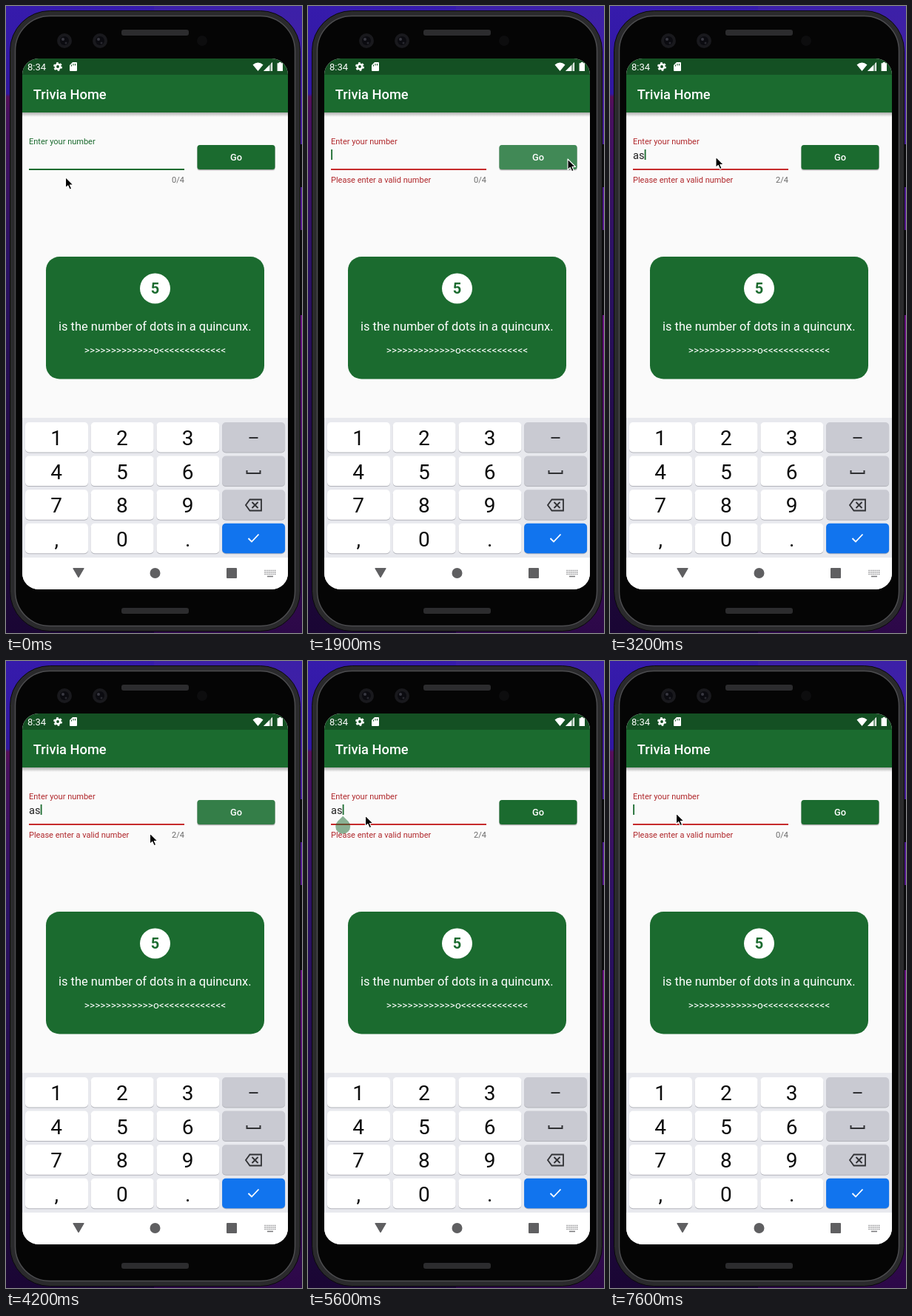
Recreate the animation shown at these times as an HTML page. Size 400 px wide and 848 px high, loop 8000 ms.

```html
<!DOCTYPE html>
<html lang="en">
<head>
<meta charset="utf-8">
<style>
  html, body { margin: 0; width: 100%; height: 100%; overflow: hidden; background: #000; }
  svg { display: block; width: 100%; height: 100%; }
  text { font-family: Roboto, sans-serif; white-space: pre; }
  .mid { text-anchor: middle; }
  .medium { font-weight: 500; }
  .small { font-size: 11px; }
</style>
</head>
<body>
<svg viewBox="0 0 400 848">
  <defs>
    <linearGradient id="leftWall" x2="0" y2="1">
      <stop offset="0" stop-color="#361bac"/><stop offset=".14" stop-color="#3017a0"/>
      <stop offset=".145" stop-color="#560f58"/><stop offset=".17" stop-color="#48105e"/>
      <stop offset=".4" stop-color="#2b1266"/><stop offset=".75" stop-color="#210a42"/>
      <stop offset="1" stop-color="#1a0634"/>
    </linearGradient>
    <linearGradient id="rightWall" x2="0" y2="1">
      <stop offset="0" stop-color="#3c20a8"/><stop offset=".25" stop-color="#4a1e98"/>
      <stop offset=".5" stop-color="#6a1282"/><stop offset=".75" stop-color="#42105e"/>
      <stop offset="1" stop-color="#2c0848"/>
    </linearGradient>
    <linearGradient id="barShadow" x2="0" y2="1">
      <stop offset="0" stop-opacity=".3"/><stop offset="1" stop-opacity="0"/>
    </linearGradient>
    <clipPath id="screen"><rect x="22" y="71" width="359" height="718" rx="22"/></clipPath>
    <clipPath id="buttonShape"><rect x="258.5" y="188" width="105" height="33" rx="3.5"/></clipPath>
  </defs>

  <rect width="200" height="848" fill="url(#leftWall)"/>
  <rect x="200" width="200" height="848" fill="url(#rightWall)"/>

  <!-- phone body -->
  <path d="M396 187h4v58h-4zM396 303h4v115h-4z" fill="#0b0b0d"/>
  <rect x="5.500" y="6.500" width="392" height="839" rx="54" fill="#2a2a2c" stroke="#09090a"/>
  <rect x="12.500" y="13.500" width="378" height="825" rx="47" fill="#050505" stroke="#4c4c4f" stroke-width="1.500"/>
  <g fill="#2c2c2e">
    <rect x="156" y="32" width="91" height="8" rx="3"/>
    <rect x="156" y="814" width="91" height="8" rx="3"/>
  </g>
  <g id="lenses"></g>
  <circle cx="265" cy="47" r="7" fill="#0d0d0e"/>

  <g clip-path="url(#screen)">
    <rect x="22" y="71" width="359" height="718" fill="#fafafa"/>
    <rect x="22" y="144" width="359" height="6" fill="url(#barShadow)"/>
    <rect x="22" y="71" width="359" height="23" fill="#145023"/>
    <rect x="22" y="93" width="359" height="51" fill="#1b6b2f"/>

    <!-- status bar -->
    <g fill="#fff">
      <text x="29" y="87" font-size="13">8:34</text>
      <circle cx="70" cy="82" r="3.200" fill="none" stroke="#fff" stroke-width="2.600"/>
      <circle cx="70" cy="82" r="5" fill="none" stroke="#fff" stroke-width="2" stroke-dasharray="2.620 2.620"/>
      <path d="M90 76h5q1 0 1 1v10q0 1-1 1h-8q-1 0-1-1v-7z"/>
      <path d="M88.500 79.500v2M91 78v2.500M93.500 78v2.500" stroke="#145023"/>
      <path d="M333.500 79.500q7-6 14 0L340.500 88z"/>
      <path d="M360 76v12h-12z" opacity=".45"/><path d="M356 80v8h-8z"/><path d="M360 76v12h-1.500v-10.500z"/>
      <path d="M368.800 76h3v1.300h2.200v10.700h-7.400v-10.700h2.200z"/>
      <text class="medium" x="36.800" y="126" font-size="18.280">Trivia Home</text>
    </g>

    <!-- form -->
    <text id="label" class="small" x="31" y="187">Enter your number</text>
    <text id="value" x="31" y="206.500" font-size="14.600" fill="#222"></text>
    <rect id="line" x="31" y="220" width="210" height="2"/>
    <text id="error" class="small" x="31" y="238.500" fill="#b0282c">Please enter a valid number</text>
    <text id="counter" class="small" x="241" y="238.500" text-anchor="end" fill="#6a6a6a"></text>
    <rect id="caret" y="194" width="1.800" height="14" fill="#1b6b2f"/>
    <path id="handle" d="M0 -14L7.070 -7.070A10 10 0 1 1 -7.070 -7.070Z" fill="#1b6b2f"/>

    <rect x="258" y="189" width="106" height="34" rx="4" opacity=".1"/>
    <rect x="258.500" y="189" width="105" height="33" rx="3.500" opacity=".25"/>
    <g clip-path="url(#buttonShape)">
      <rect x="258" y="188" width="106" height="33" fill="#1b6b2f"/>
      <rect id="glow" x="258" y="188" width="106" height="33" fill="#d8fff0"/>
      <circle id="ripple" cy="207" fill="#d8fff0" opacity=".1"/>
    </g>
    <text class="mid medium" x="311" y="209" font-size="12.800" fill="#fff">Go</text>

    <!-- fact card -->
    <rect x="54" y="339" width="295" height="165.500" rx="18.300" fill="#1b6b2f"/>
    <circle cx="201.500" cy="382" r="20.500" fill="#fff"/>
    <g class="mid" fill="#fff">
      <text x="201.500" y="388.500" font-size="20" font-weight="700" fill="#1b6b2f">5</text>
      <text x="201.300" y="438.500" font-size="16.450">is the number of dots in a quincunx.</text>
      <text x="201.500" y="470" font-size="13.700">&gt;&gt;&gt;&gt;&gt;&gt;&gt;&gt;&gt;&gt;&gt;&gt;&gt;o&lt;&lt;&lt;&lt;&lt;&lt;&lt;&lt;&lt;&lt;&lt;&lt;&lt;</text>
    </g>

    <!-- keyboard and navigation -->
    <rect x="22" y="557" width="359" height="189" fill="#e8e9ee"/>
    <g id="keys"></g>
    <g fill="none" stroke="#303134" stroke-width="2">
      <path d="M328.500 584h12"/>
      <path d="M325.500 628v4h18v-4"/>
      <path d="M329.500 667.500h15.500v15h-15.500l-5.500-7.500zM332.500 671l8 8m0-8l-8 8" stroke-width="1.800"/>
      <path d="M327.500 720l4.500 4.500 9.500-10" stroke="#fff" stroke-width="1.800"/>
    </g>
    <rect x="22" y="746" width="359" height="43" fill="#fff"/>
    <g fill="#5f5f61">
      <path d="M91 760h14q1 0 .5 1l-6.700 11.500q-.8 1-1.600 0L90.500 761q-.5-1 .5-1z"/>
      <circle cx="201.500" cy="767" r="7"/>
      <rect x="298" y="760" width="14" height="14" rx="1"/>
    </g>
    <path d="M349.500 763.500h15M349.500 766h15M349.500 768.500h15" stroke="#77777a" stroke-width="1.300" stroke-dasharray="1.300 1.380"/>
    <path d="M353 771.500h8" stroke="#77777a" stroke-width="1.300"/>
  </g>

  <path id="pointer" d="M0 0V14.500L3.300 11.500L5.600 16.700L8.200 15.600L5.900 10.500H10.500Z" fill="#000" stroke="#fff" stroke-width="1.100" stroke-linejoin="round"/>
</svg>

<script>
const LOOP = 8000, STEP = 100;
const GREEN = '#1b6b2f';
const el = id => document.getElementById(id);
const set = (id, attrs) => {
  for (const name in attrs) el(id).setAttribute(name, attrs[name]);
};

el('lenses').innerHTML = [79, 127].map(x =>
  `<circle cx="${x}" cy="47" r="10" fill="#19191d"/><circle cx="${x}" cy="47" r="6" fill="#0b0b10"/>
   <circle cx="${x - 2}" cy="45" r="2" fill="#393942"/><circle cx="${x + 2}" cy="50" r="1.5" fill="#292930"/>`).join('');

el('keys').innerHTML = ['123 ', '456 ', '789 ', ',0. '].map((row, r) => [...row].map((char, c) => {
  const x = 26 + c * 88.7, y = 563 + r * 45.6;
  const fill = c < 3 ? '#fff' : r < 3 ? '#c9cad2' : '#1174ee';
  const key = (top, color) => `<rect x="${x}" y="${top}" width="85" height="40.5" rx="5" fill="${color}"/>`;
  return key(y + 1, '#b2b3ba') + key(y, fill) +
    `<text class="mid" x="${x + 42.2}" y="${y + 31.2}" font-size="28" fill="#0c0c0c">${char}</text>`;
}).join('')).join('');

// Linear interpolation over rows of [time, value, ...].
function track(rows, t) {
  const next = rows.findIndex(row => row[0] > t);
  if (next < 0) return rows[rows.length - 1].slice(1);
  const from = rows[next - 1], to = rows[next];
  const k = (t - from[0]) / (to[0] - from[0]);
  return from.slice(1).map((v, i) => v + (to[i + 1] - v) * k);
}

const pointerPath = [
  [0, 80.5, 231.5], [1000, 80.5, 231.5], [1600, 351, 207], [1900, 351, 207],
  [2500, 143, 204], [3200, 143, 204], [3700, 325, 206], [3900, 325, 206],
  [4200, 194.5, 233], [4800, 94.5, 251], [4900, 94.5, 251], [5400, 77.5, 209],
  [7000, 77.5, 209], [7300, 89.5, 206]
];
const glowLevel = [
  [0, 0], [1500, 0], [1700, .08], [1900, .2], [2000, .16], [2300, 0],
  [3600, 0], [3800, .08], [4000, .2], [4200, .13], [4500, 0]
];
const handleLevel = [[0, 0], [5500, 0], [5700, 1], [6300, 1], [6500, 0]];
const edits = [[0, ''], [3000, 'a'], [3100, 'as'], [6300, 'a'], [6600, '']];
const caretResets = [1700, 3000, 3100, 5600, 6300, 6600];
const presses = [[1700, 351], [3800, 325]];
const caretOffset = { '': 0, a: 7.5, as: 15.5 };

function draw(t) {
  const text = edits.filter(([start]) => start <= t).pop()[1];
  const invalid = t >= 1700;
  const reset = caretResets.filter(start => start <= t).pop();
  const caretOn = reset !== undefined && Math.floor((t - reset) / 500) % 2 === 0;
  const caretX = 31.2 + caretOffset[text];

  el('value').textContent = text;
  el('counter').textContent = text.length + '/4';
  set('label', { fill: invalid ? '#b0282c' : GREEN });
  set('line', { fill: invalid ? '#c62a2c' : GREEN });
  set('error', { opacity: track([[0, 0], [1600, 0], [1800, 1]], t)[0] });
  set('caret', { x: caretX, opacity: +caretOn });
  set('handle', { transform: `translate(${caretX + .5} 223.7)`, opacity: track(handleLevel, t)[0] });

  const press = presses.find(([start]) => t >= start && t < start + 200);
  set('glow', { opacity: track(glowLevel, t)[0] });
  set('ripple', { cx: press ? press[1] : 0, r: press ? 20 + (t - press[0]) * .4 : 0 });

  const [x, y] = track(pointerPath, t);
  set('pointer', { transform: `translate(${x} ${y})` });
}

function tick() {
  draw(Math.floor(performance.now() % LOOP / STEP) * STEP);
  requestAnimationFrame(tick);
}
tick();
</script>
</body>
</html>
```
